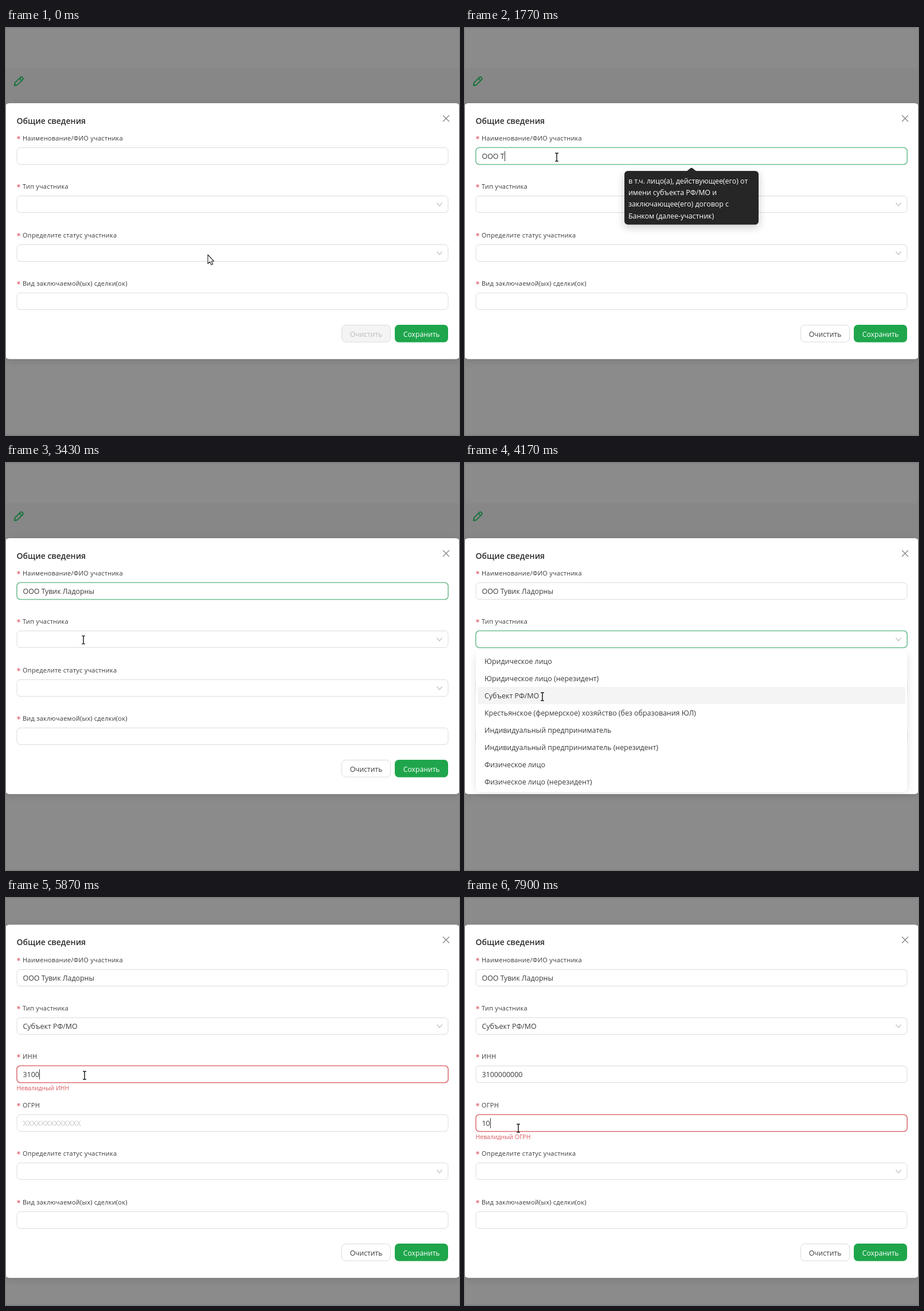
These frames come from a looping animation (790x709 px, 8 s). An HTML page:

```html
<!DOCTYPE html>
<html lang="ru">
<head>
<meta charset="utf-8">
<title>Общие сведения</title>
<style>
  html, body { margin: 0; width: 100%; height: 100%; overflow: hidden; background: #8b8b8b; }
  svg { display: block; width: 790px; height: 709px; }
  text { font: 12.4px "Open Sans", "Noto Sans", sans-serif; fill: #3a3a3a; white-space: pre; }
  .title { font-size: 14px; font-weight: 600; fill: #2b2b2b; }
  .label { font-size: 11px; letter-spacing: .24px; }
  .hint { font-size: 13.5px; fill: #c6c6c6; }
  .error { font-size: 10.5px; fill: #dc585f; }
  .button { text-anchor: middle; font-size: 12.2px; }
  .white { fill: #fff; }
  .muted { fill: #bcbcbc; }
</style>
</head>
<body>
<svg viewBox="0 0 790 709">
  <defs>
    <filter id="soft" x="-20%" y="-20%" width="140%" height="150%">
      <feGaussianBlur stdDeviation="7"/>
    </filter>
  </defs>
  <rect width="790" height="709" fill="#8b8b8b"/>
  <rect y="70" width="790" height="62" fill="#878787"/>
  <path d="M0 .5H790M0 708.5H790" stroke="#828282"/>
  <path d="M14.8 100.2L15.8 95.2L25.2 85.8Q26.8 84.4 28.6 86.2Q30.6 88.2 29.2 89.8L19.8 99.2ZM23.4 87.8L27.3 91.7"
    fill="none" stroke="#14733a" stroke-width="1.9" stroke-linejoin="round"/>
  <g id="scene"></g>
</svg>
<script>
const LOOP = 8000, PITCH = 84.4, LEFT = 19, WIDTH = 752;
const GREEN = '#5cb882', RED = '#dc5a60';
const COMPANY = 'ООО Тувик Ладорны', INN = '3100000000', OGRN = '10';
const TYPES = [
  'Юридическое лицо', 'Юридическое лицо (нерезидент)', 'Субъект РФ/МО',
  'Крестьянское (фермерское) хозяйство (без образования ЮЛ)',
  'Индивидуальный предприниматель', 'Индивидуальный предприниматель (нерезидент)',
  'Физическое лицо', 'Физическое лицо (нерезидент)'
];
const TOOLTIP = ['в т.ч. лицо(а), действующее(его) от', 'имени субъекта РФ/МО и',
  'заключающее(его) договор с', 'Банком (далее-участник)'];

const AT = { focusName: 690, focusType: 3480, pick: 4400, focusInn: 4610, focusOgrn: 7150 };
const POINTER = [
  [40, 352, 395], [640, 160, 225], [2980, 160, 225], [3380, 135, 308],
  [3720, 135, 310], [4110, 135, 407], [4440, 135, 407], [4600, 137, 309],
  [6780, 137, 309], [7110, 93, 401]
];
const keyTimes = {
  name: [...COMPANY].map((_, i) => i < 4 ? 900 + i * 170 : 1760 + (i - 4) * 80),
  inn: [...INN].map((_, i) => 5420 + i * 135),
  ogrn: [7640, 7810]
};

const scene = document.getElementById('scene');
const pen = document.createElement('canvas').getContext('2d');

const clamp = v => Math.max(0, Math.min(1, v));
const ramp = (t, start, length = 200) => clamp((t - start) / length);
const pulse = (t, on, off, length) => ramp(t, on, length) - ramp(t, off, length);
const ease = v => v * v * (3 - 2 * v);
const typed = (word, times, t) => word.slice(0, times.filter(k => k <= t).length);

const text = (x, y, content, cls = '') => `<text x="${x}" y="${y}" class="${cls}">${content}</text>`;
const rect = (x, y, w, h, r, attrs) =>
  `<rect x="${x}" y="${y}" width="${w}" height="${h}" rx="${r}" ${attrs}/>`;
const group = (content, opacity, transform = '') =>
  opacity > 0 ? `<g opacity="${opacity}" transform="${transform}">${content}</g>` : '';

function textWidth(content) {
  pen.font = '12.4px "Open Sans", "Noto Sans", sans-serif';
  return pen.measureText(content).width;
}

function pointerAt(t) {
  const next = POINTER.findIndex(p => p[0] > t);
  if (next < 0) return POINTER[POINTER.length - 1].slice(1);
  if (next === 0) return POINTER[0].slice(1);
  const [t0, x0, y0] = POINTER[next - 1], [t1, x1, y1] = POINTER[next];
  const k = ease((t - t0) / (t1 - t0));
  return [x0 + (x1 - x0) * k, y0 + (y1 - y0) * k];
}

function caret(value, y, t, start, end, times) {
  if (t < start || t >= end) return '';
  const last = Math.max(start, ...times.filter(k => k <= t));
  if ((t - last) % 1060 >= 530) return '';
  const x = Math.round(30 + textWidth(value)) + .5;
  return `<path d="M${x} ${y + 6}V${y + 23.5}" stroke="#333"/>`;
}

function field(y, { label, value = '', hint = '', select, focus = 0, error }) {
  const color = error ? RED : GREEN;
  const box = attrs => rect(LEFT, y, WIDTH, 29, 6, attrs);
  const star = [30, 90, 150].map(a =>
    `<path d="M-3 0H3" transform="translate(22 ${y - 17.5}) rotate(${a})"/>`).join('');
  return `<g stroke="#e4747d" stroke-width="1.2">${star}</g>`
    + text(29, y - 13, label, 'label')
    + group(box(`fill="none" stroke="${color}" stroke-width="3.5" stroke-opacity=".25"`), focus * focus)
    + box('fill="#fff" stroke="#dcdcdc"')
    + group(box(`fill="none" stroke="${color}" stroke-width="1.1"`), error ? 1 : clamp(focus * 2))
    + (value ? text(29.5, y + 19.8, value) : hint && text(29.5, y + 19.8, hint, 'hint'))
    + (select ? `<path d="M751.5 ${y + 12}l4.5 5.5l4.5 -5.5" fill="none" stroke="#c2c2c2" stroke-width="1.2"/>` : '')
    + (error ? text(18.5, y + 42.5, error, 'error') : '');
}

function buttons(y, enabled) {
  return rect(585.5, y, 85, 29.5, 7, `fill="${enabled ? '#fff' : '#f4f4f4'}" stroke="#dadada"`)
    + text(628, y + 20.3, 'Очистить', enabled ? 'button' : 'button muted')
    + rect(678, y - .5, 93, 30.5, 7, 'fill="#1fa64c"')
    + text(724.7, y + 20.3, 'Сохранить', 'button white');
}

function tooltip(opacity) {
  return group(
    rect(276, 253, 238, 96, 8, 'fill="#000" opacity=".16" filter="url(#soft)"')
    + '<path d="M386 250L393.5 244Q395 242.8 396.5 244L404 250Z" fill="#262626"/>'
    + rect(278, 249, 234, 93.5, 6, 'fill="#262626"')
    + TOOLTIP.map((line, i) => text(285, 270.6 + i * 20.4, line, 'white')).join(''), opacity);
}

function dropdown(opacity, pointerY) {
  const active = Math.max(0, Math.min(7, Math.floor((pointerY - 330.5) / 30)));
  const scale = .8 + .2 * opacity;
  return group(
    rect(LEFT, 332, WIDTH, 240, 7, 'fill="#000" opacity=".12" filter="url(#soft)"')
    + rect(LEFT, 326, WIDTH, 247, 7, 'fill="#fff"')
    + rect(22.5, 390 + (active - 2) * 30, 745.5, 30, 4, 'fill="#f4f4f4"')
    + TYPES.map((type, i) => text(34, 350 + i * 30, type)).join(''),
    opacity, `translate(0 ${326 * (1 - scale)}) scale(1 ${scale})`);
}

function pointer(t) {
  const [x, y] = pointerAt(t);
  const shape = t < 600
    ? '<path d="M0 0V15.5L3.6 12.2L6 17.6L8.6 16.5L6.2 11.2H10.6Z" fill="#fff" stroke="#222" stroke-width="1.1" stroke-linejoin="round"/>'
    : '<path d="M-2.8 -7H-1Q0 -7 0 -6Q0 -7 1 -7H2.8M0 -6V6M-2.8 7H-1Q0 7 0 6Q0 7 1 7H2.8" fill="none" stroke="#111" stroke-width="1.4"/>';
  return `<g transform="translate(${x} ${y})">${shape}</g>`;
}

function draw(t) {
  const full = t >= AT.pick;
  const top = full ? 46.5 : 131;
  // Borders sit on pixel centres so that they stay crisp.
  const row = i => Math.floor(top + 77.55 + i * PITCH) + .5;
  const name = typed(COMPANY, keyTimes.name, t);
  const inn = typed(INN, keyTimes.inn, t);
  const ogrn = typed(OGRN, keyTimes.ogrn, t);

  const fields = [
    { label: 'Наименование/ФИО участника', value: name, focus: pulse(t, AT.focusName, AT.focusType) },
    { label: 'Тип участника', value: full ? TYPES[2] : '', select: true, focus: pulse(t, AT.focusType, AT.focusInn) }
  ];
  if (full) fields.push(
    { label: 'ИНН', value: inn, hint: 'X'.repeat(10), focus: pulse(t, AT.focusInn, AT.focusOgrn),
      error: inn && inn.length < INN.length && 'Невалидный ИНН' },
    { label: 'ОГРН', value: ogrn, hint: 'X'.repeat(13), focus: ramp(t, AT.focusOgrn), error: ogrn && 'Невалидный ОГРН' });
  fields.push(
    { label: 'Определите статус участника', select: true },
    { label: 'Вид заключаемой(ых) сделки(ок)' });

  const last = row(fields.length - 1);
  const height = last + 115.3 - top;
  scene.innerHTML =
    rect(-2, top + 4, 794, height - 2, 8, 'fill="#000" opacity=".14" filter="url(#soft)"')
    + rect(-2, top, 794, height, 8, 'fill="#fff"')
    + text(18.5, top + 35.7, 'Общие сведения', 'title')
    + `<path d="M762 ${top + 21}l11 11m0 -11l-11 11" stroke="#858585" stroke-width="1.3"/>`
    + fields.map((f, i) => field(row(i), f)).join('')
    + buttons(last + 56, name.length > 0)
    + caret(name, row(0), t, AT.focusName, AT.focusType, keyTimes.name)
    + (full ? caret(inn, row(2), t, AT.focusInn, AT.focusOgrn, keyTimes.inn)
      + caret(ogrn, row(3), t, AT.focusOgrn, LOOP, keyTimes.ogrn) : '')
    + tooltip(pulse(t, 590, 3240, 110))
    + (full ? '' : dropdown(ease(ramp(t, AT.focusType + 20)), pointerAt(t)[1]))
    + pointer(t);
}

const start = performance.now();
function frame() {
  draw((performance.now() - start) % LOOP);
  requestAnimationFrame(frame);
}
frame();
</script>
</body>
</html>
```
